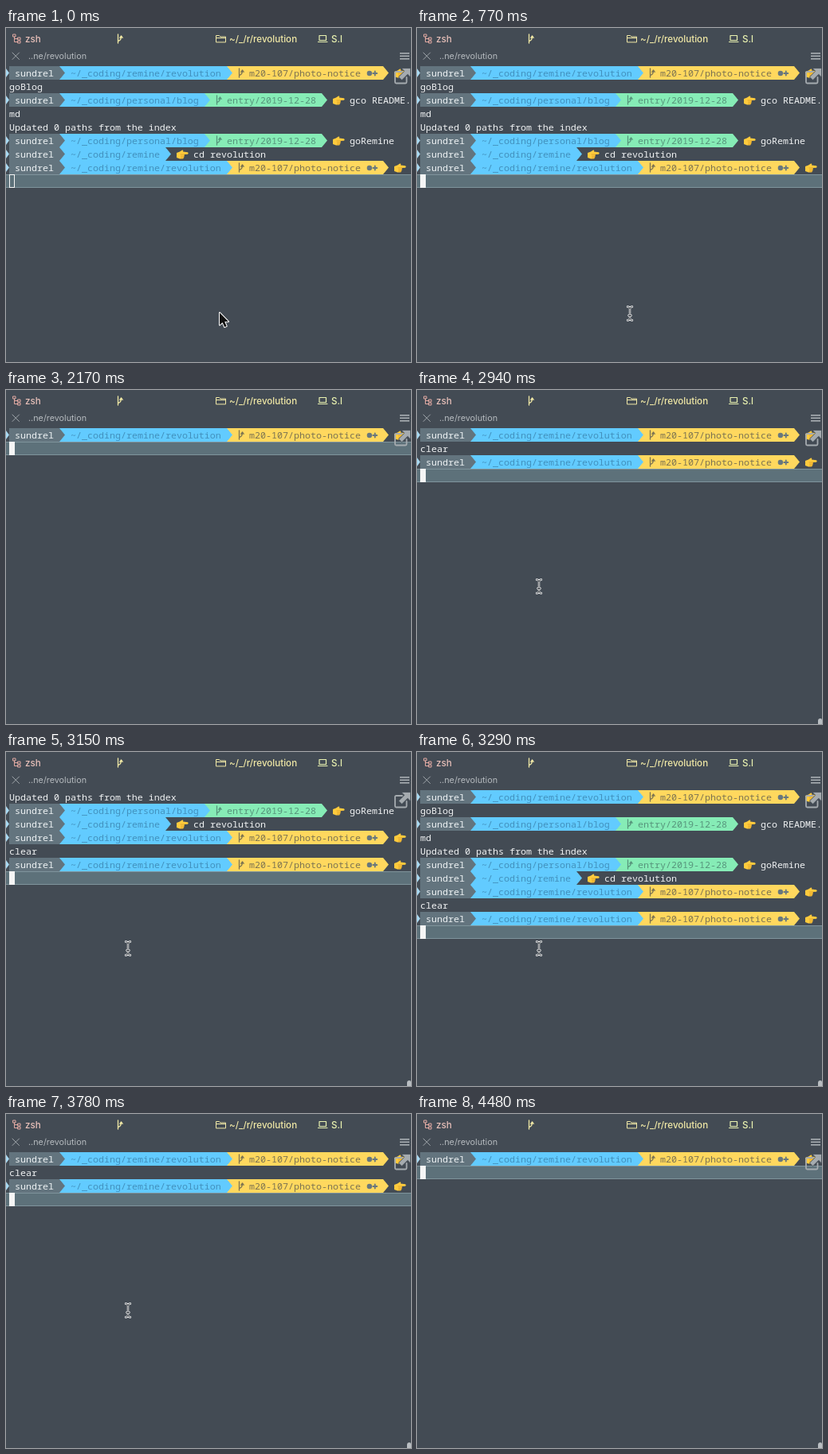
Recreate the animation shown at these times as an HTML page with a canvas. Size 508 by 420 pixels, loop 4690 ms.

```html
<!DOCTYPE html>
<html lang="en">
<head>
<meta charset="utf-8">
<title>Terminal scrollback</title>
<style>
  html, body { margin: 0; width: 100%; height: 100%; overflow: hidden; background: #434b54; }
  canvas { display: block; }
</style>
</head>
<body>
<canvas id="stage" width="508" height="420"></canvas>
<script>
const ctx = document.getElementById('stage').getContext('2d');

const LOOP = 4690, STEP = 70;
const LEFT = 4, TOP = 48, CELL = 7, ROW = 17;
const MONO = '11.667px "Noto Sans Mono", monospace';
const SANS = 'Inter, sans-serif';
const BG = '#434b54', LIGHT = '#f1f3f4';
const USER = { fill: '#63747e', ink: '#eef2f4', text: 'sundrel' };
const YELLOW = { fill: '#ffd85e', ink: '#7b7352', icon: true };
const GREEN = { fill: '#86ecb6', ink: '#57957c', icon: true };

// Times of the typed letters and of the steps that follow them
const KEYS = [1050, 1190, 1330, 1400, 1540];
const FOCUS = 140, ENTER = 1680, CLEARED = 1820, PROMPT = 2100;
const MOUSE_BACK = 2450, SCROLL = 2870, MOUSE_GONE = 4480;
const SCROLL_TOPS = [9, 8, 7, 6, 5, 3, 1, 0, 0, 1, 2, 4, 6, 8, 9, 10];

const dir = text => ({ fill: '#62cbff', ink: '#4291bd', text });
const prompt = (path, branch, command = '') => ({
  command, segments: [USER, dir('~/_coding/' + path), ...(branch ? [branch] : [])]
});
const notice = { ...YELLOW, text: 'm20-107/photo-notice', dirty: true };
const entry = { ...GREEN, text: 'entry/2019-12-28' };
const lines = [
  'clear',
  prompt('remine/revolution', notice),
  'goBlog',
  prompt('personal/blog', entry, 'gco README.'),
  'md',
  'Updated 0 paths from the index',
  prompt('personal/blog', entry, 'goRemine'),
  prompt('remine', null, 'cd revolution'),
  prompt('remine/revolution', notice),
  'clear',
  prompt('remine/revolution', notice)
];

function rect(x, y, w, h, fill) {
  ctx.fillStyle = fill;
  ctx.fillRect(x, y, w, h);
}

function write(text, x, y, fill, font = MONO) {
  ctx.font = font;
  ctx.fillStyle = fill;
  ctx.fillText(text, x, y);
}

function shape(x, y, d, { fill, stroke, width = 1 }) {
  const path = new Path2D(d);
  ctx.save();
  ctx.translate(x, y);
  ctx.lineWidth = width;
  ctx.lineJoin = ctx.lineCap = 'round';
  if (stroke) { ctx.strokeStyle = stroke; ctx.stroke(path); }
  if (fill) { ctx.fillStyle = fill; ctx.fill(path); }
  ctx.restore();
}

const arrowEnd = (x, y, fill) => shape(x, y, 'M0 0L7 8.5L0 17Z', { fill });

function branchIcon(x, y, color) {
  shape(x, y, 'M1.5 0V11M1.5 8.5Q5.5 7.5 5.5 3M3.8 4.3L5.5 2L7.2 4.3', { stroke: color, width: 1.3 });
}

function hand(x, y) {
  shape(x, y, 'M0 5L4 3.5L7 1.5Q9 1 8 3.5L14 4.2Q15.5 5.5 14 6.8L9.5 7Q10.5 8 9.3 9Q10 10.3 8.7 11Q9 12.5 7.2 12.5H4L0 11Z',
    { fill: '#ffcb3d' });
  shape(x, y, 'M5 7H9.5M5.5 9.2H9M5.5 11.2H8.5', { stroke: '#d69622', width: .7 });
}

function drawPrompt({ segments, command }, y) {
  shape(0, y, 'M0 3L4 8.5L0 14Z', { fill: '#a9d9f2' });
  let x = LEFT, previous;
  for (const { fill, ink, text, icon, dirty } of segments) {
    const cells = text.length + 2 + (icon ? 2 : 0) + (dirty ? 3 : 0) + (previous ? 1 : 0);
    rect(x, y, cells * CELL, ROW, fill);
    if (previous) arrowEnd(x, y, previous);
    let pen = x + CELL * (previous ? 2 : 1);
    if (icon) {
      branchIcon(pen, y + 3, ink);
      pen += 2 * CELL;
    }
    write(text, pen, y + 13, ink);
    if (dirty) {
      pen += (text.length + 1) * CELL;
      shape(pen, y, 'M.7 9a3.2 3.2 0 1 0 6.4 0a3.2 3.2 0 1 0 -6.4 0', { fill: '#68777d' });
      shape(pen, y, 'M8.3 9H13.3M10.8 6.5V11.5', { stroke: '#68777d', width: 1.9 });
    }
    x += cells * CELL;
    previous = fill;
  }
  arrowEnd(x, y, previous);
  hand(x + 2 * CELL, y + 2);
  write(command, x + 5 * CELL, y + 13, LIGHT);
}

function drawCursorRow(y, column, focused) {
  rect(0, y, 508, ROW, '#5d717a');
  rect(0, y, 508, 1, '#7f949c');
  rect(0, y + ROW - 1, 508, 1, '#7f949c');
  const x = LEFT + column * CELL;
  if (focused) {
    rect(x, y, CELL, ROW, '#f5f5f5');
  } else {
    ctx.strokeStyle = '#f5f5f5';
    ctx.lineWidth = 1;
    ctx.strokeRect(x + .5, y + .5, CELL - 1, ROW - 1);
  }
}

function drawBars() {
  const red = '#e3aaa3', cream = '#f1e9a6', lime = '#e9f2b0';
  const title = '500 11.6px ' + SANS;
  shape(8, 8, 'M1 0H4V3H1ZM2.5 3V9.5H7M2.5 5.5H7M7 4H10V7H7ZM7 8H10V11H7Z', { stroke: red });
  write('zsh', 24, 17.5, '#e9c1ba', title);
  branchIcon(139, 8, cream);
  shape(263, 8, 'M.5 9.5V1.5H4.5L6 3H12.5V9.5ZM.5 4.5H12.5', { stroke: cream });
  write('~/_/r/revolution', 280, 17.5, cream, title);
  shape(391, 9, 'M2 .5H10.5V6.5H2ZM.5 8.5H12', { stroke: lime, width: 1.2 });
  write('S.l', 408, 17.5, lime, title);

  shape(8, 31, 'M0 0L8.5 8.5M8.5 0L0 8.5', { stroke: '#a0a6ab' });
  write('..ne/revolution', 28, 39, '#b5babe', '10.8px ' + SANS);
  for (const y of [31, 34.5, 38]) rect(494, y, 12, 1.6, '#a9afb3');
}

function drawBadge() {
  const gray = '#a5abaf';
  shape(487, 50, 'M10 5H2.5Q1 5 1 6.5V18Q1 19.5 2.5 19.5H14Q15.5 19.5 15.5 18V12', { stroke: gray, width: 1.8 });
  shape(487, 50, 'M10 1H20V11L16.8 7.8L9.5 15L6 11.5L13.2 4.2Z', { fill: gray, stroke: '#515a62', width: 1.4 });
}

// Position of the pointer, or null while typing hides it
function pointer(t) {
  if (t < KEYS[0]) return [267, 359];
  if (t < MOUSE_BACK || t >= MOUSE_GONE) return null;
  const back = 1 - Math.min(1, (t - MOUSE_BACK) / 280);
  const leave = Math.max(0, (t - 3920) / 560);
  return [153 + 114 * back ** 2 + 115 * leave, 247 + 94 * back ** 2 + 166 * leave];
}

function drawPointer(t) {
  const at = pointer(t);
  if (!at) return;
  if (t < FOCUS) {
    shape(268, 358, 'M0 0V15.5L3.6 12.2L6.2 18L8.7 16.9L6.2 11.2H11Z', { fill: '#111', stroke: '#fff', width: 2 });
    return;
  }
  const beam = 'M-3 -8.5Q0 -8.5 0 -6Q0 -8.5 3 -8.5M0 -6V6M-3 8.5Q0 8.5 0 6Q0 8.5 3 8.5M-1.5 2.5H1.5';
  shape(...at, beam, { stroke: '#fff', width: 2.4 });
  shape(...at, beam, { stroke: '#2b3036', width: .9 });
}

function scrollTop(t) {
  if (t < CLEARED) return 1;
  if (t < SCROLL) return 10;
  return SCROLL_TOPS[Math.min((t - SCROLL) / STEP, SCROLL_TOPS.length - 1)];
}

function draw(t) {
  rect(0, 0, 508, 420, BG);
  drawBars();

  const top = scrollTop(t);
  const cursorLine = t < ENTER ? 9 : t < PROMPT ? 10 : 11;
  const rowY = line => TOP + (line - top) * ROW;
  const typed = t < ENTER ? 'clear'.slice(0, KEYS.filter(key => t >= key).length) : '';

  for (let i = top; i < cursorLine; i++) {
    if (typeof lines[i] === 'string') write(lines[i], LEFT, rowY(i) + 13, LIGHT);
    else drawPrompt(lines[i], rowY(i));
  }
  drawCursorRow(rowY(cursorLine), typed.length, t >= FOCUS);
  write(typed, LEFT, rowY(cursorLine) + 13, LIGHT);

  drawBadge();
  if (t >= SCROLL) shape(503, 412, 'M0 8V4Q0 1 3 1Q5 1 5 3V8Z', { fill: '#b9bec2' });
  drawPointer(t);
}

function tick() {
  draw(Math.floor(performance.now() % LOOP / STEP) * STEP);
  requestAnimationFrame(tick);
}
tick();
</script>
</body>
</html>
```
